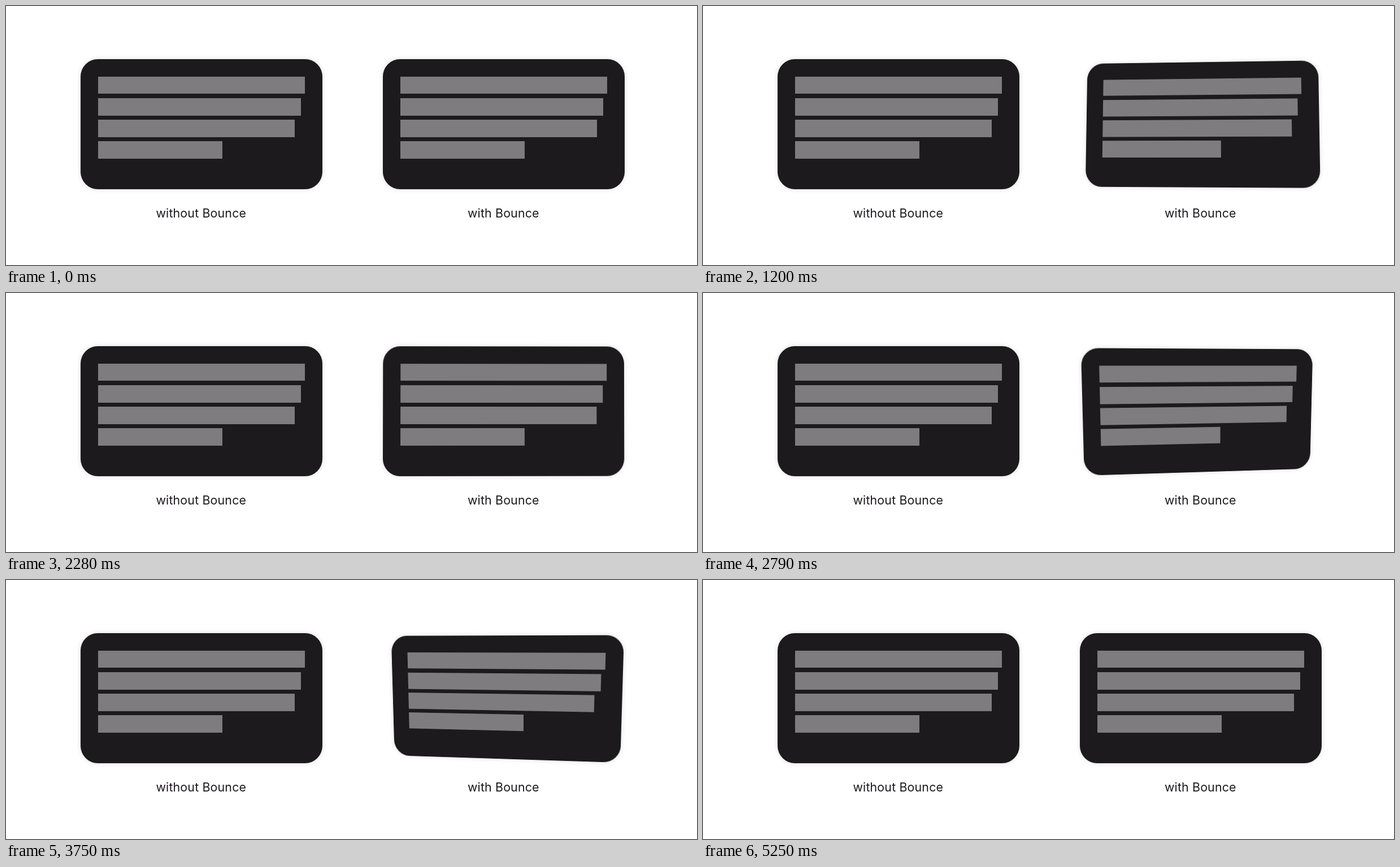
An HTML page for the animation above (6.15 s loop, 1223 by 458 pixels).

```html
<!DOCTYPE html>
<html lang="en">
<head>
<meta charset="utf-8">
<title>Bounce</title>
<style>
  html, body { margin: 0; width: 100%; height: 100%; overflow: hidden; background: #fff; }
  .card {
    position: absolute; top: 94px; width: 428px; height: 229.5px;
    border-radius: 30.6px; background: #1c1a1d;
    box-shadow: 0 0 10px rgba(0, 0, 0, .13);
  }
  .card i { position: absolute; left: 30.6px; height: 30.6px; background: #7f7c7f; }
  svg { position: absolute; left: 0; top: 0; }
  text {
    font: 21.4px Inter, Roboto, sans-serif; letter-spacing: .15px;
    text-anchor: middle; fill: #1c1a1d;
  }
</style>
</head>
<body>
<div class="card" style="left:132px"></div>
<div class="card" id="bouncy" style="left:667px"></div>
<svg width="1223" height="458">
  <text x="345.3" y="374">without Bounce</text>
  <text x="880.3" y="374">with Bounce</text>
</svg>
<script>
const LOOP = 6150, STEP = 30, DURATION = 400;
const PRESS_LEAD = 70, RELEASE_LEAD = 50;

// down and up: first visible step of each move; rx, ry: full tilt in degrees
const presses = [
  { down: 720,  up: 1170, rx: 5.3,  ry: -5.7 },
  { down: 1620, up: 2040, rx: 8,    ry: 8 },
  { down: 2580, up: 3060, rx: -6.1, ry: 8 },
  { down: 3570, up: 4020, rx: -7.3, ry: -8.2 },
  { down: 4470, up: 4890, rx: 0,    ry: 0 }
];

for (const card of document.querySelectorAll('.card')) {
  [1, .98, .95, .6].forEach((part, row) => {
    const bar = document.createElement('i');
    bar.style.width = 366.9 * part + 'px';
    bar.style.top = 30.8 + 38.2 * row + 'px';
    card.append(bar);
  });
}

const bezier = (a, b, s) => 3 * a * s * (1 - s) ** 2 + 3 * b * s * s * (1 - s) + s ** 3;

// Same curve as the CSS "ease" keyword
function ease(x) {
  if (x <= 0) return 0;
  if (x >= 1) return 1;
  let low = 0, high = 1;
  for (let i = 0; i < 24; i++) {
    const mid = (low + high) / 2;
    if (bezier(.25, .25, mid) < x) low = mid; else high = mid;
  }
  return bezier(.1, 1, low);
}

function depth(press, t) {
  if (t < press.down) return 0;
  if (t < press.up) return ease((t - press.down + PRESS_LEAD) / DURATION);
  return 1 - ease((t - press.up + RELEASE_LEAD) / DURATION);
}

const bouncy = document.getElementById('bouncy');

function draw(time) {
  const t = Math.floor(time % LOOP / STEP) * STEP;
  const press = presses.filter(p => p.down <= t).pop();
  const d = press ? depth(press, t) : 0;
  bouncy.style.transform = d
    ? `perspective(800px) rotateX(${press.rx * d}deg) rotateY(${press.ry * d}deg) scale(${1 - .05 * d})`
    : 'none';
}

const start = performance.now();
function tick() {
  draw(performance.now() - start);
  requestAnimationFrame(tick);
}
tick();
</script>
</body>
</html>
```
